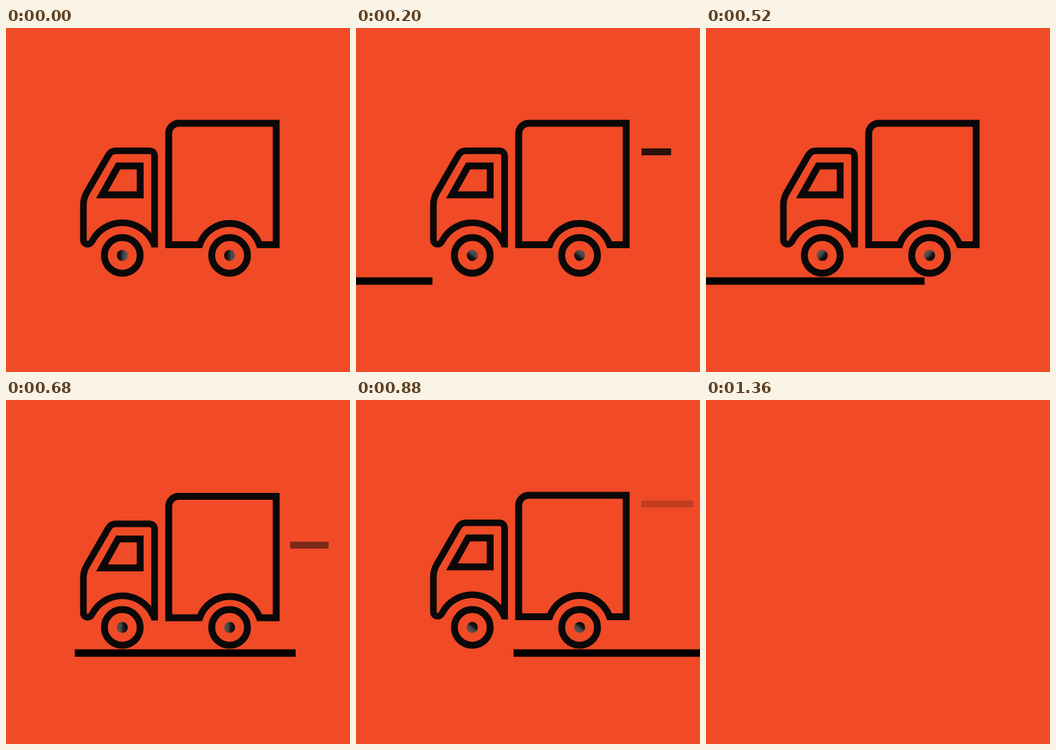
Write an HTML page that moves like this. It is 500x500 px and loops after 1400 ms.

```html
<!DOCTYPE html>
<html lang="en">
<head>
<meta charset="utf-8">
<title>Delivery truck</title>
<style>
  html, body { margin: 0; width: 100%; height: 100%; overflow: hidden; background: #f04a26; }
  svg { display: block; width: 100%; height: 100%; }
  .line { fill: none; stroke: #0a0809; stroke-width: 10; }
</style>
</head>
<body>
<svg viewBox="0 0 500 500">
  <defs>
    <linearGradient id="shine">
      <stop offset=".1" stop-color="#0c0a0b"/>
      <stop offset=".4" stop-color="#1c1a1b"/>
      <stop offset=".6" stop-color="#484647"/>
      <stop offset="1" stop-color="#585657"/>
    </linearGradient>
    <g id="wheel">
      <circle class="line" r="26" stroke-width="10.4"/>
      <circle class="hub" r="8" fill="url(#shine)"/>
    </g>
  </defs>
  <rect id="road" y="362.4" width="321" height="10.8"/>
  <g id="dashes" fill="#0a0809">
    <rect x="415" y="175" width="43" height="10"/>
    <rect x="413" y="206" width="56" height="10"/>
    <rect x="415" y="146" width="75" height="10"/>
  </g>
  <g id="truck">
    <g id="body" class="line">
      <path d="M236.5 315V153A14.5 14.5 0 0 1 251 138.4H392.7V315H368.5A46 46 0 0 0 281.5 315Z"/>
      <path d="M216 319V186A7.5 7.5 0 0 0 208.5 178.5H160Q152.500 178.500 149 184.500L117.500 239Q112.500 247.500 112.500 257V308C112.500 315.500 122 316.500 125 310A49.400 49.400 0 0 1 213 310L216 316" stroke-width="9.6"/>
      <path d="M139.500 242.500L163 200.500H195V242.500Z"/>
    </g>
    <g class="wheel" transform="translate(169 330.5)">
      <circle class="line" r="26"/>
      <circle class="hub" r="8" fill="url(#shine)"/>
    </g>
    <g class="wheel" transform="translate(325 330.5)">
      <circle class="line" r="26"/>
      <circle class="hub" r="8" fill="url(#shine)"/>
    </g>
  </g>
</svg>
<script>
  const LOOP = 1400, STEP = 40, RUN = 1360;
  const $ = id => document.getElementById(id);
  const road = $('road'), body = $('body'), truck = $('truck');
  const dashes = [...$('dashes').children];
  const hubs = document.querySelectorAll('.wheel .hub');
  const dashPeaks = [218, 740, 976];
  const bumps = [340, 680, 1020];

  // 1 at the peak, falling linearly to 0 at the given distance
  const tent = (t, peak, reach) => Math.max(0, 1 - Math.abs(t - peak) / reach);

  function draw(t) {
    road.setAttribute('x', -339 + 0.6455 * t);
    dashes.forEach((d, i) => d.setAttribute('opacity', tent(t, dashPeaks[i], 120)));
    const drop = 1.5 * Math.max(...bumps.map(b => tent(t, b, 100)));
    body.setAttribute('transform', `translate(0 ${drop})`);
    hubs.forEach(h => h.setAttribute('transform', `rotate(${-360 * t / RUN})`));
    truck.setAttribute('visibility', t < RUN ? 'visible' : 'hidden');
  }

  const start = performance.now();
  function tick() {
    const t = (performance.now() - start) % LOOP;
    draw(Math.floor(t / STEP) * STEP);
    requestAnimationFrame(tick);
  }
  tick();
</script>
</body>
</html>
```
